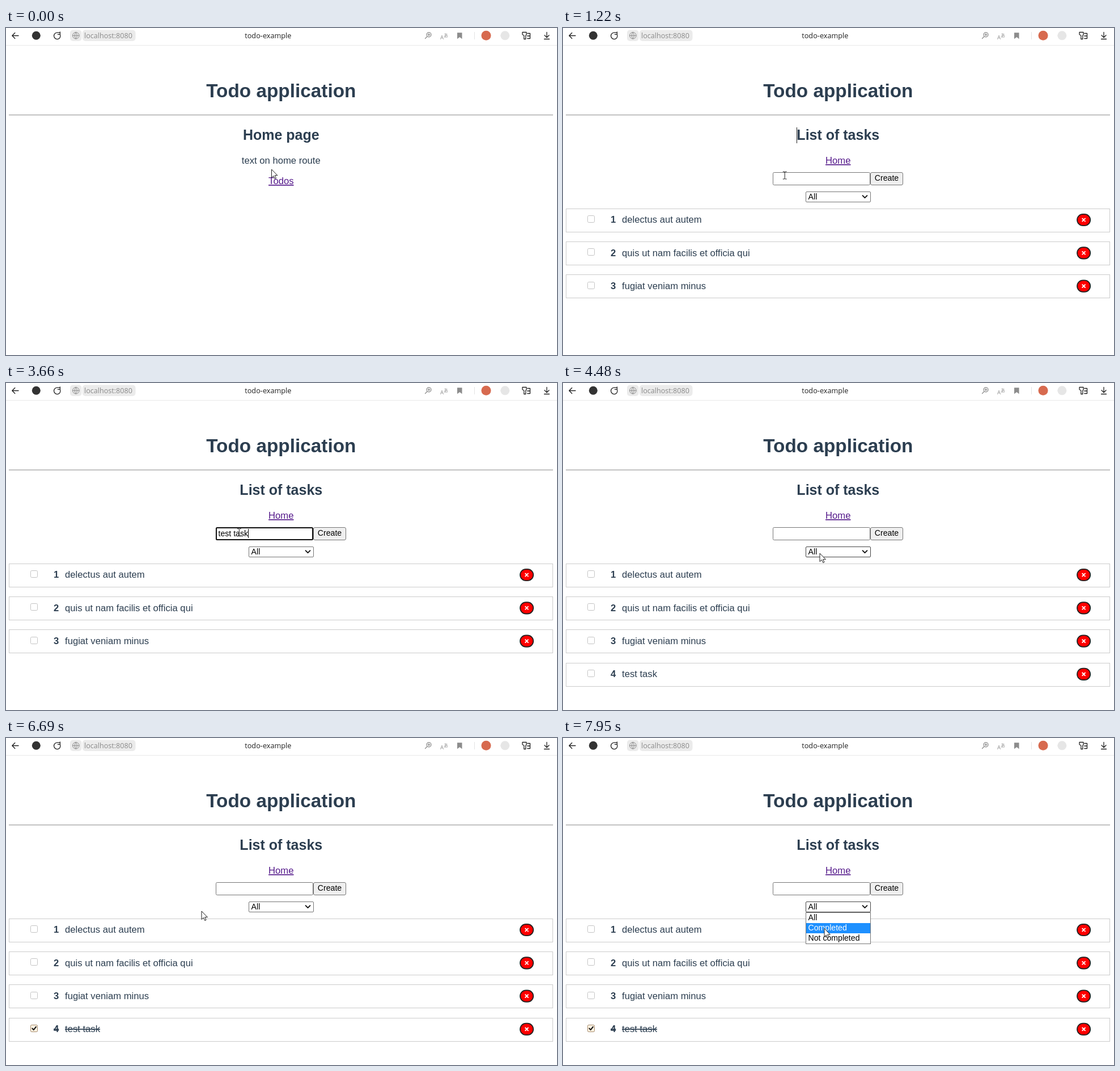
Write an HTML page that moves like this. It is 972 px wide and 576 px high and loops after 8000 ms.

```html
<!DOCTYPE html>
<html lang="en">
<head>
<meta charset="utf-8">
<title>todo-example</title>
<style>
html, body { margin: 0; width: 100%; height: 100%; overflow: hidden; background: #fff; }
svg { display: block; font-family: "Liberation Sans", Arial, sans-serif; }
text { white-space: pre; }
.ui { font-family: "Open Sans", "Noto Sans", sans-serif; }
.page { fill: #2c3e50; font-size: 16.67px; }
.h1 { font-size: 33.33px; font-weight: bold; }
.h2 { font-size: 25px; font-weight: bold; }
.mid { text-anchor: middle; }
.link { fill: #551a8b; text-decoration: underline; }
.form { font-size: 14.1px; fill: #000; }
.line { fill: none; stroke-width: 1.3; stroke-linecap: round; stroke-linejoin: round; }
.struck { text-decoration: line-through; }
</style>
</head>
<body>
<svg id="stage" width="972" height="576" viewBox="0 0 972 576"></svg>
<script>
const LOOP = 8000;
const MID = 485.3;

const text = (x, y, s, cls, extra = '') => `<text x="${x}" y="${y}" class="${cls}" ${extra}>${s}</text>`;
const rect = (x, y, w, h, fill, extra = '') =>
  `<rect x="${x}" y="${y}" width="${w}" height="${h}" fill="${fill}" ${extra}/>`;
const circle = (x, y, r, fill, extra = '') => `<circle cx="${x}" cy="${y}" r="${r}" fill="${fill}" ${extra}/>`;
const line = (d, color, extra = '') => `<path class="line" d="${d}" stroke="${color}" ${extra}/>`;
const group = (id, body, extra = '') => `<g id="${id}" ${extra}>${body}</g>`;

function toolbar() {
  const dark = '#222', gray = '#8c8c8c';
  return rect(0, 30, 972, 1, '#e8e8e8') +
    line('M22 13.5H11M15.8 8.5L10.8 13.5L15.8 18.5', dark) +
    circle(53.3, 13.3, 7.5, '#333') +
    line('M95.2 11A5.7 5.7 0 1 1 91 8.2M91 8.2H95.4M95.4 7V11.4H91.4', dark) +
    rect(113, 3.5, 20.5, 19.5, '#ebebeb', 'rx="5"') +
    rect(135, 3.5, 93.5, 19.5, '#ebebeb', 'rx="5"') +
    line('M117.5 13.3a5.8 5.8 0 1 0 11.6 0a5.8 5.8 0 1 0 -11.6 0M117.5 13.3H129.1M123.3 7.5Q119 13.3 123.3 19.1Q127.6 13.3 123.3 7.5',
      gray, 'style="stroke-width:1"') +
    text(138, 18, 'localhost:8080', 'ui', 'font-size="12.6" fill="#8a8a8a"') +
    text(462.3, 18, 'todo-example', 'ui mid', 'font-size="12.7" fill="#222"') +
    circle(746, 11.8, 4, 'none', `stroke="${gray}" stroke-width="1.2"`) +
    line('M743 15L739.5 18.5M744 11.8H748M746 9.8V13.8', gray) +
    text(766, 19.5, 'A', 'ui', `font-size="9.5" fill="${gray}"`) +
    text(772, 15.5, 'あ', 'cjk', `font-size="8" fill="${gray}" font-family="Noto Sans CJK JP, Noto Sans CJK, sans-serif"`) +
    `<path d="M796 8.2h8.5v11l-4.2 -3.2l-4.3 3.2z" fill="${gray}"/>` +
    rect(826, 7, 1, 13, '#e2e2e2') +
    circle(847, 13.3, 8.5, '#d76a4f') +
    circle(880.3, 13.3, 8, '#e6e6e6') +
    line('M911 7.5H918V12L916.8 13.2V19.5H913.8V13.2L911 11.5ZM919.8 9.5H924.5V14H919.8M924.5 14V18.5H919.8', dark) +
    line('M954 7.5V16.5M950 12.8L954 16.8L958 12.8M949.5 19.5H958.5', dark);
}

function row(i, label) {
  const y = 317.7 + i * 58.3;
  const top = Math.round(y) + .5;
  const box = Math.round(y + 12.4) + .5;
  const base = Math.round(y + 25.7);
  const done = i === 3 ? group('tick',
    rect(43.5, box, 12, 12, '#fff4e2', 'rx="2" stroke="#a58a6c"') +
    line(`M46.4 ${box + 6.1}l2.3 2.6l4.2 -5.4`, '#111', 'style="stroke-width:2"')) : '';
  return group('row' + i,
    rect(5.5, top, 959, 41, '#fff', 'stroke="#ccc"') +
    rect(43.5, box, 12, 12, '#fff', 'rx="2" stroke="#c4c4c4"') + done +
    text(84, base, i + 1, 'page label', 'font-weight="bold"') +
    text(104, base, label, 'page label') +
    rect(907, y + 10.1, 23.2, 20.4, '#f00', 'rx="10.2" stroke="#222" stroke-width="1.8"') +
    line(`M916.2 ${y + 17.9}l4.8 4.8m0 -4.8l-4.8 4.8`, '#fff', 'style="stroke-width:1.9"'));
}

const options = ['All', 'Completed', 'Not completed'];
const tasks = ['delectus aut autem', 'quis ut nam facilis et officia qui', 'fugiat veniam minus', 'test task'];

const home = text(MID, 197, 'Home page', 'page h2 mid') +
  text(MID, 239, 'text on home route', 'page mid') +
  text(MID, 275, 'Todos', 'page link mid');

const list = text(MID, 197, 'List of tasks', 'page h2 mid') +
  text(MID, 239, 'Home', 'page link mid') +
  rect(370.5, 254.5, 171, 22, '#fff', 'rx="2" stroke="#767676"') +
  rect(371, 255, 170, 21, '#fff', 'id="focus" rx="1.5" stroke="#101010" stroke-width="2"') +
  text(374.5, 270, '', 'form', 'id="typed"') +
  rect(0, 257, 1, 16, '#000', 'id="caret"') +
  rect(542.5, 254.5, 57, 22, '#efefef', 'id="create" rx="2.5" stroke="#767676"') +
  text(571, 269, 'Create', 'form mid') +
  rect(428.5, 288.5, 114, 18, '#fff', 'id="select" rx="1.5"') +
  text(432.6, 302, 'All', 'form') +
  line('M528.5 295.2L532.5 299.2L536.5 295.2', '#111', 'style="stroke-width:1.9"') +
  tasks.map((s, i) => row(i, s)).join('') +
  line('M454.2 363A37 37 0 0 0 488.2 402.4', '#4aa8f8', 'id="spinner" style="stroke-width:6;stroke-linecap:butt"') +
  group('menu',
    rect(428.5, 307.5, 114, 55, '#fff', 'stroke="#767676"') +
    rect(429, 308, 113, 18, '#1e90ff', 'id="mark"') +
    options.map((s, i) => text(432.6, 320.6 + 18 * i, s, 'form option')).join(''));

const pointer = group('pointer',
  `<path id="arrow" d="M0 0V14.6L3.4 11.5L5.8 16.6L8 15.6L5.7 10.7H10.4Z" fill="#fff" stroke="#111" stroke-width=".95"/>` +
  `<path id="hand" d="M-1.2 0Q0 -1.6 1.2 0V5.2L8 6.8Q9.4 7.4 9 9.4L7.6 15.6H-.8L-4.6 9.8Q-4.8 7.8 -2.8 8.4L-1.2 9.8Z" fill="#fff" stroke="#111" stroke-width=".95"/>` +
  line('M-3 -6.5H-1L0 -5.8L1 -6.5H3M0 -5.8V5.8M-3 6.5H-1L0 5.8L1 6.5H3', '#222', 'id="beam" style="stroke-width:1"'));

document.getElementById('stage').innerHTML = toolbar() +
  text(MID, 122, 'Todo application', 'page h1 mid') +
  rect(5, 152.6, 960, 1.1, '#929292') +
  group('home', home) + group('list', list) +
  rect(0, 175, 1, 28, '#222', 'id="headCaret"') +
  group('status', rect(-3, 558.5, 101.5, 20, '#f0f0f0', 'rx="3" stroke="#e2e2e2"') +
    text(3, 571.5, 'localhost:8080/todos', 'ui', 'font-size="9.5" fill="#666"')) +
  pointer;

const el = id => document.getElementById(id);
const attr = (id, name, value) => el(id).setAttribute(name, value);
const show = (id, yes) => { el(id).style.display = yes ? '' : 'none'; };

// time, x, y of the pointer's hot spot
const path = [
  [0, 468.5, 249], [70, 468.5, 249], [140, 471, 264], [410, 471, 264], [730, 375, 228],
  [1340, 393, 263], [1670, 393, 263], [1690, 395.5, 263], [3600, 395.5, 263], [3930, 572, 266],
  [4410, 572, 266], [4480, 453, 300], [4550, 453, 300], [5280, 48, 470], [5690, 46.5, 507.5],
  [5960, 46.5, 507.5], [6100, 42, 506], [6690, 345, 305], [6890, 470, 291], [7090, 470, 291],
  [7150, 467, 279], [7350, 465, 317], [7400, 465, 317], [7550, 462, 356], [7740, 462, 356],
  [7950, 461, 335.5], [LOOP, 461, 335.5]
];

// time and number of letters entered
const typing = [[1820, 1], [2020, 3], [2280, 4], [2410, 5], [2610, 6], [2800, 7], [3080, 8], [3200, 9], [4150, 0]];

function pointerAt(t) {
  const i = path.findIndex((p, n) => n && t <= p[0]);
  const [a, b] = [path[i - 1], path[i]];
  const u = (t - a[0]) / (b[0] - a[0]);
  const k = u * u * (3 - 2 * u);
  return [a[1] + (b[1] - a[1]) * k, a[2] + (b[2] - a[2]) * k];
}

const between = (t, a, b) => t >= a && t < b;

function draw(t) {
  const [x, y] = pointerAt(t);
  const over = (x0, y0, x1, y1) => between(x, x0, x1) && between(y, y0, y1);
  const onList = t >= 410;
  show('home', !onList);
  show('list', onList);
  show('status', between(t, 280, 930));
  show('headCaret', between(t, 140, 1410));
  attr('headCaret', 'x', onList ? 412 : 418);

  show('spinner', t < 1140);
  attr('spinner', 'transform', `rotate(${(t - 730) * .36} 491.2 365.5)`);
  tasks.forEach((_, i) => show('row' + i, t >= (i < 3 ? 1140 : 4150)));

  const focus = between(t, 1410, 4010);
  show('focus', focus);
  const count = typing.reduce((n, [at, len]) => t >= at ? len : n, 0);
  const typed = el('typed');
  typed.textContent = tasks[3].slice(0, count);
  show('caret', focus);
  attr('caret', 'x', Math.round(374.3 + (count ? typed.getComputedTextLength() : 0)));

  attr('create', 'fill', over(542, 254, 600, 277) ? '#e3e3e3' : '#efefef');
  const open = t >= 7210;
  attr('select', 'stroke', open || over(428, 288, 542, 306) ? '#444' : '#767676');

  const done = t >= 6030;
  show('tick', done);
  el('row3').querySelectorAll('.label').forEach(n => n.classList.toggle('struck', done));

  show('menu', open);
  const pick = Math.max(0, Math.min(2, Math.floor((y - 308) / 18)));
  attr('mark', 'y', 308 + 18 * pick);
  document.querySelectorAll('.option').forEach((n, i) => { n.style.fill = i === pick ? '#fff' : '#000'; });

  const hand = between(t, 110, 410);
  const beam = t > 730 && t < 4000 && over(370, 254, 542, 277);
  show('hand', hand);
  show('beam', beam);
  show('arrow', !hand && !beam);
  attr('pointer', 'transform', `translate(${x.toFixed(2)} ${y.toFixed(2)})`);
}

const start = performance.now();
function tick(now) {
  draw(Math.max(0, now - start) % LOOP);
  requestAnimationFrame(tick);
}
draw(0);
requestAnimationFrame(tick);
</script>
</body>
</html>
```
